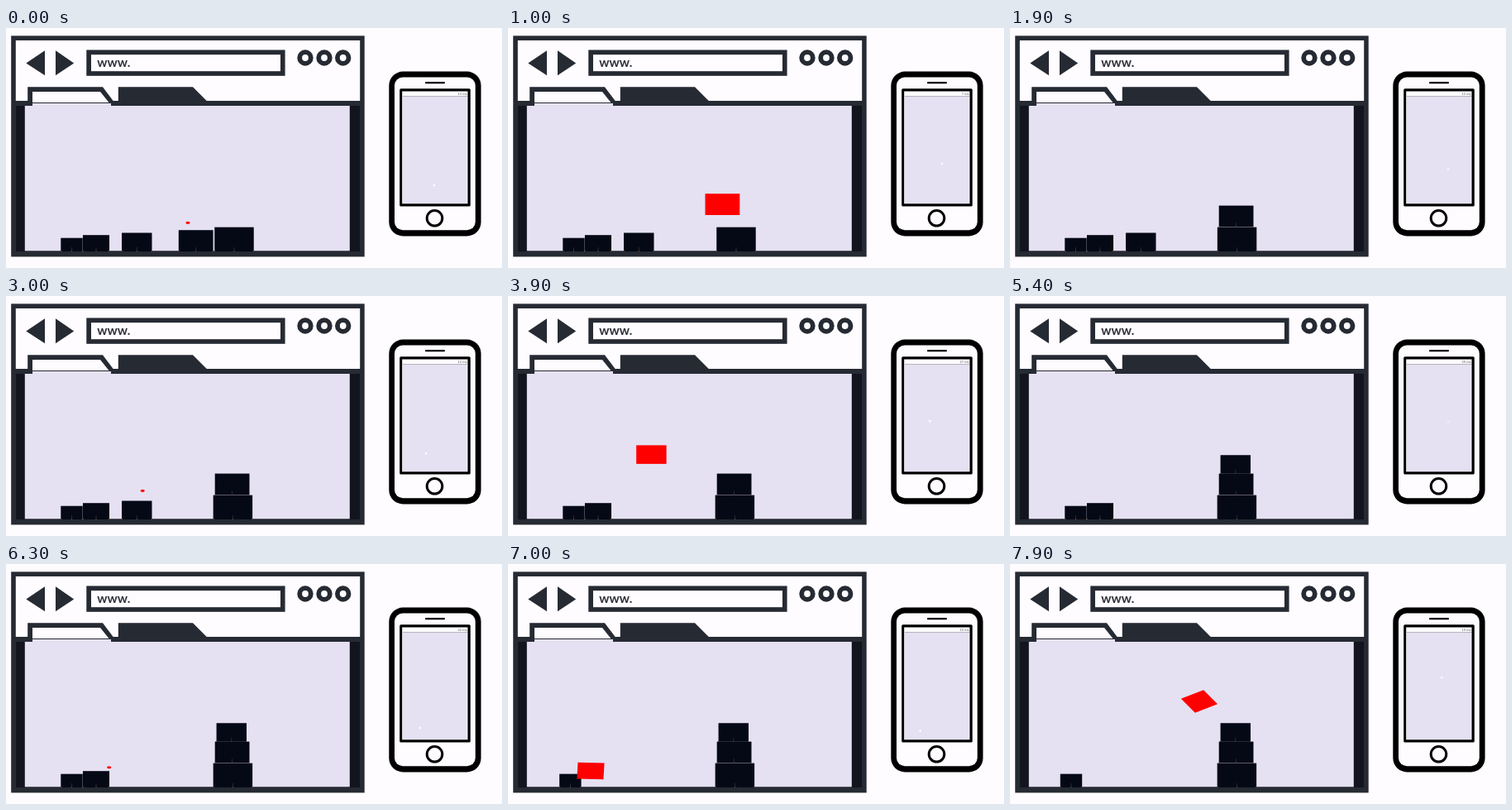
Write an HTML page with a canvas that moves like this. It is 600 px wide and 290 px high and loops after 8000 ms.

```html
<!DOCTYPE html>
<html lang="en">
<head>
<meta charset="utf-8">
<title>Phone as a touch pad</title>
<style>
html, body { margin: 0; width: 100%; height: 100%; overflow: hidden; background: #fefcff; }
canvas { display: block; width: 600px; height: 290px; }
</style>
</head>
<body>
<canvas id="stage" width="600" height="290"></canvas>
<script>
const ctx = document.getElementById('stage').getContext('2d');
const LOOP = 8000, STEP = 100, STRETCH = 1.62, FLOOR = 270;
const INK = '#262a33', NIGHT = '#050916', SIDE = '#12141e';
const LILAC = '#e5e1f2', PAPER = '#fefcff', RED = '#ff0000';

// A box rests on the floor at x, then makes its moves: each runs over a time
// span along a curve that bends towards "via" and ends at "to".
const boxes = [
  { x: 79.5, size: 16.3, moves: [{ span: [6700, 7300], to: [74, 261.8] }] },
  { x: 109, size: 19.8, grab: [6600, LOOP], hold: [14, 0], moves: [
    { span: [6700, 7000], to: [100, 250], turn: 2 },
    { span: [7000, 7900], via: [50, 215], to: [229, 166], turn: -34 }] },
  { x: 158.3, size: 22.5, grab: [3200, 5300], hold: [4, -7], moves: [
    { span: [3300, 3900], via: [134, 215], to: [173.4, 191.6] },
    { span: [4500, 5300], via: [250, 150], to: [272.8, 203.5] }] },
  { x: 229.7, size: 25.8, grab: [500, 1900], hold: [-1, -12], moves: [
    { span: [800, 1900], via: [286, 165], to: [273.6, 227.5] }] },
  { x: 276, size: 29.3, moves: [{ span: [1700, 2000], to: [274.4, 255.3] }] }
];
// Touches that glide over the screen before a box is grabbed.
const touches = [
  { span: [0, 500], from: [220, 235], to: [228, 244] },
  { span: [2400, 3200], from: [205, 223], to: [152, 239] },
  { span: [5900, 6600], from: [131, 234], to: [120, 254] }
];

const progress = (t, [a, b]) => Math.min(1, Math.max(0, (t - a) / (b - a)));
const within = (t, [a, b]) => t >= a && t < b;
const mix = (a, b, u) => a + (b - a) * u;
const mixPoint = (a, b, u) => [mix(a[0], b[0], u), mix(a[1], b[1], u)];

function pose(box, t) {
  let at = [box.x, FLOOR - box.size / 2], angle = 0;
  for (const move of box.moves) {
    const u = progress(t, move.span), e = u * (2 - u);
    const via = move.via || mixPoint(at, move.to, 0.5);
    at = mixPoint(mixPoint(at, via, e), mixPoint(via, move.to, e), e);
    angle += (move.turn || 0) * e * e;
  }
  return { at, angle };
}

function fill(color, x, y, w, h) {
  ctx.fillStyle = color;
  ctx.fillRect(x, y, w, h);
}

function shape(color, points) {
  ctx.fillStyle = color;
  ctx.beginPath();
  points.forEach(p => ctx.lineTo(p[0], p[1]));
  ctx.fill();
}

function ring(x, y, r, width, color) {
  ctx.strokeStyle = color;
  ctx.lineWidth = width;
  ctx.beginPath();
  ctx.arc(x, y, r, 0, Math.PI * 2);
  ctx.stroke();
}

function rounded(color, x, y, w, h, r) {
  ctx.fillStyle = color;
  ctx.beginPath();
  ctx.roundRect(x, y, w, h, r);
  ctx.fill();
}

function ellipse(color, x, y, rx, ry) {
  ctx.fillStyle = color;
  ctx.beginPath();
  ctx.ellipse(x, y, rx, ry, 0, 0, Math.PI * 2);
  ctx.fill();
}

function drawBrowser() {
  fill(INK, 6.2, 9.4, 427.5, 267);
  fill(PAPER, 11.8, 15, 416.4, 73);
  shape(INK, [[24.3, 42.5], [47, 27.3], [47, 57.3]]);
  shape(INK, [[60, 27.3], [82.2, 42.5], [60, 57.3]]);
  fill(INK, 97.3, 26.5, 240.3, 31.3);
  fill(PAPER, 103, 32.2, 229, 20);
  ctx.fillStyle = '#303238';
  ctx.font = 'bold 15.3px Lato, sans-serif';
  ctx.textAlign = 'left';
  ctx.fillText('www.', 110.2, 46.6);
  [362, 385, 407.7].forEach(x => ring(x, 36, 6.8, 5.8, INK));

  shape(INK, [[135.8, 71.2], [226, 71.2], [243, 88.2], [135.8, 88.2]]);
  shape(INK, [[26.2, 71.2], [117, 71.2], [130, 88.5], [130, 94], [26.2, 94]]);
  shape(PAPER, [[32, 77], [114, 77], [124.5, 90], [32, 90]]);
  fill(SIDE, 12, 94, 416, 176);
  fill(LILAC, 22.8, 94, 393, 175.3);
  fill(LILAC, 32, 91, 95, 3);
}

function drawPhone() {
  rounded('#000000', 463.3, 52.6, 111.3, 198.8, 17);
  rounded(PAPER, 470, 59.5, 97.8, 184.8, 10);
  rounded('#000000', 507, 65, 24, 2.3, 1);
  rounded('#000000', 476.2, 73.3, 85.6, 142.2, 1.5);
  fill(PAPER, 479.2, 76.5, 79.3, 135.8);
  fill(LILAC, 480, 83, 77.5, 129);
  fill('#a2a2a8', 480, 82, 78, 0.8);
  ring(518.5, 229.8, 9.3, 3, '#000000');
}

function drawBox(box, t, held) {
  const s = box.size, h = s / 2, { at, angle } = pose(box, t);
  ctx.save();
  ctx.translate(at[0], at[1]);
  ctx.scale(STRETCH, 1);
  ctx.rotate(angle * Math.PI / 180);
  fill(held ? RED : NIGHT, -h, -h, s, s);
  if (!held) {
    fill('#30303a', -0.25, h - 5, 0.5, 5);
    [-h, -0.3, h - 0.6].forEach(x => fill('#7c532d', x, h - 1, 0.6, 1));
  }
  ctx.restore();
}

function drawTouch(x, y, alpha = 1) {
  ctx.globalAlpha = alpha;
  ellipse('#ffffff', 518 + (x - 220) / 5.5, 137 + (y - 166) / 1.3, 1.3, 1.3);
  ctx.globalAlpha = 1;
}

function drawLatency(t) {
  const noise = Math.abs(Math.sin(t / STEP * 12.9898 + 1) * 43758.5453) % 1;
  ctx.fillStyle = '#55555c';
  ctx.font = '4px "Liberation Sans", sans-serif';
  ctx.textAlign = 'right';
  ctx.fillText(7 + Math.floor(noise * noise * 23) + ' ms', 557.5, 81.2);
}

function draw(t) {
  fill(PAPER, 0, 0, 600, 290);
  drawBrowser();
  drawPhone();
  drawLatency(t);
  const held = boxes.find(b => b.grab && within(t, b.grab));
  boxes.forEach(b => { if (b !== held) drawBox(b, t, false); });
  if (held) {
    const { at } = pose(held, t);
    drawBox(held, t, true);
    drawTouch(at[0] + held.hold[0], at[1] + held.hold[1]);
  }

  const touch = touches.find(k => within(t, k.span));
  if (touch) {
    const [x, y] = mixPoint(touch.from, touch.to, progress(t, touch.span));
    ellipse(RED, x, y + 0.3, 2.6, 1.6);
    drawTouch(x, y);
  }

  // The dot fades on the phone after a box is let go.
  const freed = boxes.find(b => b.grab && within(t, [b.grab[1], b.grab[1] + 300]));
  if (freed) {
    const { at } = pose(freed, t);
    drawTouch(at[0] + 13, at[1] - 18, 0.7 * (1 - (t - freed.grab[1]) / 300));
  }
}

function tick() {
  const t = performance.now() % LOOP;
  draw(Math.floor(t / STEP) * STEP);
  requestAnimationFrame(tick);
}
tick();
</script>
</body>
</html>
```
